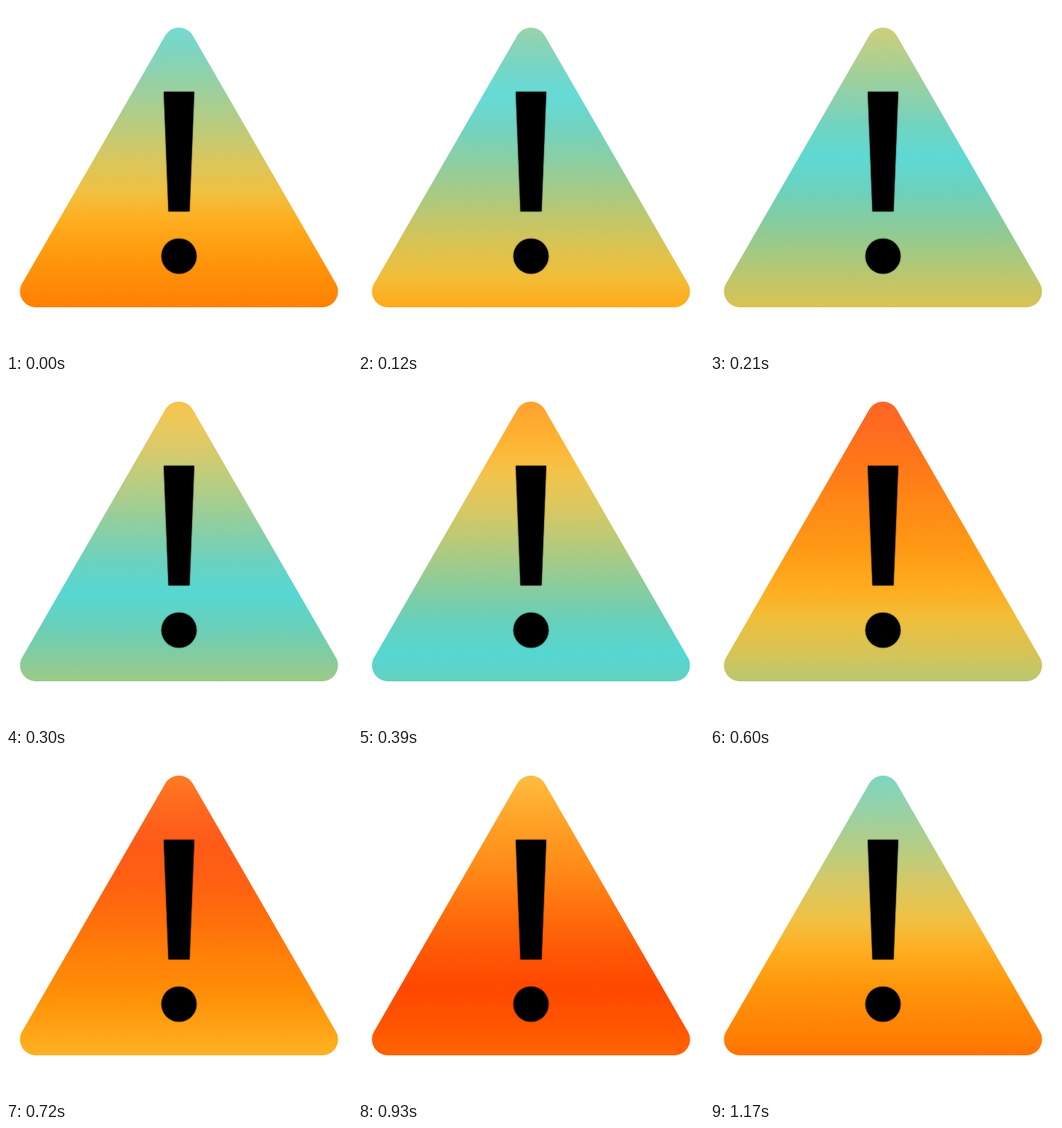
An HTML page with a canvas for the animation above (1.2 s loop, 480 px wide and 480 px high).

```html
<!DOCTYPE html>
<html lang="en">
<head>
<meta charset="utf-8">
<title>Warning sign</title>
<style>
  html, body { margin: 0; width: 100%; height: 100%; overflow: hidden; background: #fff; }
  canvas { display: block; width: 480px; height: 480px; }
</style>
</head>
<body>
<canvas id="stage" width="480" height="480"></canvas>
<script>
const ctx = document.getElementById('stage').getContext('2d');
const LOOP = 1200, STEP = 30;
const PERIOD = 1140, HALF = PERIOD / 2, START = 10;

// Distance from the cyan crest in pixels, and the colour there.
const RAMP = [
  [0, '#55d7d2'], [45, '#67d0bc'], [100, '#8ccb97'], [150, '#b0c877'],
  [200, '#d5c458'], [250, '#f1be3a'], [290, '#ffac1c'], [350, '#ff930a'],
  [410, '#ff7f04'], [470, '#ff6600'], [520, '#ff5400'], [HALF, '#ff4800']
];

const triangle = new Path2D();
roundedPolygon(triangle, [[240, 8], [476.7, 418], [3.3, 418]], 22);

const mark = new Path2D('M219 119H261L254.5 285H225.5Z');
mark.arc(240, 347, 24.3, 0, Math.PI * 2);

function roundedPolygon(path, points, radius) {
  const [a, b] = [points[0], points[points.length - 1]];
  path.moveTo((a[0] + b[0]) / 2, (a[1] + b[1]) / 2);
  points.forEach((p, i) => {
    const next = points[(i + 1) % points.length];
    // Path2D lacks a fallback for the last corner, so close it explicitly.
    path.arcTo(p[0], p[1], next[0], next[1], radius);
  });
  path.closePath();
}

// One full period, from red through cyan back to red, centred on the crest.
function bandGradient(crest) {
  const gradient = ctx.createLinearGradient(0, crest - HALF, 0, crest + HALF);
  for (const [distance, color] of RAMP) {
    gradient.addColorStop((HALF - distance) / PERIOD, color);
    gradient.addColorStop((HALF + distance) / PERIOD, color);
  }
  return gradient;
}

const sheen = ctx.createLinearGradient(0, 30, 0, 318);
sheen.addColorStop(0, 'rgba(255,255,255,.14)');
sheen.addColorStop(1, 'rgba(255,255,255,0)');

function draw(time) {
  const crest = START + PERIOD * time / LOOP;
  ctx.fillStyle = '#fff';
  ctx.fillRect(0, 0, 480, 480);

  ctx.save();
  ctx.clip(triangle);
  for (const y of [crest - PERIOD, crest]) {
    ctx.fillStyle = bandGradient(y);
    ctx.fillRect(0, Math.round(y - HALF), 480, PERIOD);
  }
  ctx.fillStyle = sheen;
  ctx.fillRect(0, 0, 480, 480);
  ctx.restore();

  ctx.save();
  ctx.shadowColor = '#000';
  ctx.shadowBlur = 2;
  ctx.fillStyle = '#000';
  ctx.fill(mark);
  ctx.restore();
}

const origin = performance.now();
function frame() {
  const elapsed = (performance.now() - origin) % LOOP;
  draw(Math.floor(elapsed / STEP) * STEP);
  requestAnimationFrame(frame);
}
frame();
</script>
</body>
</html>
```
